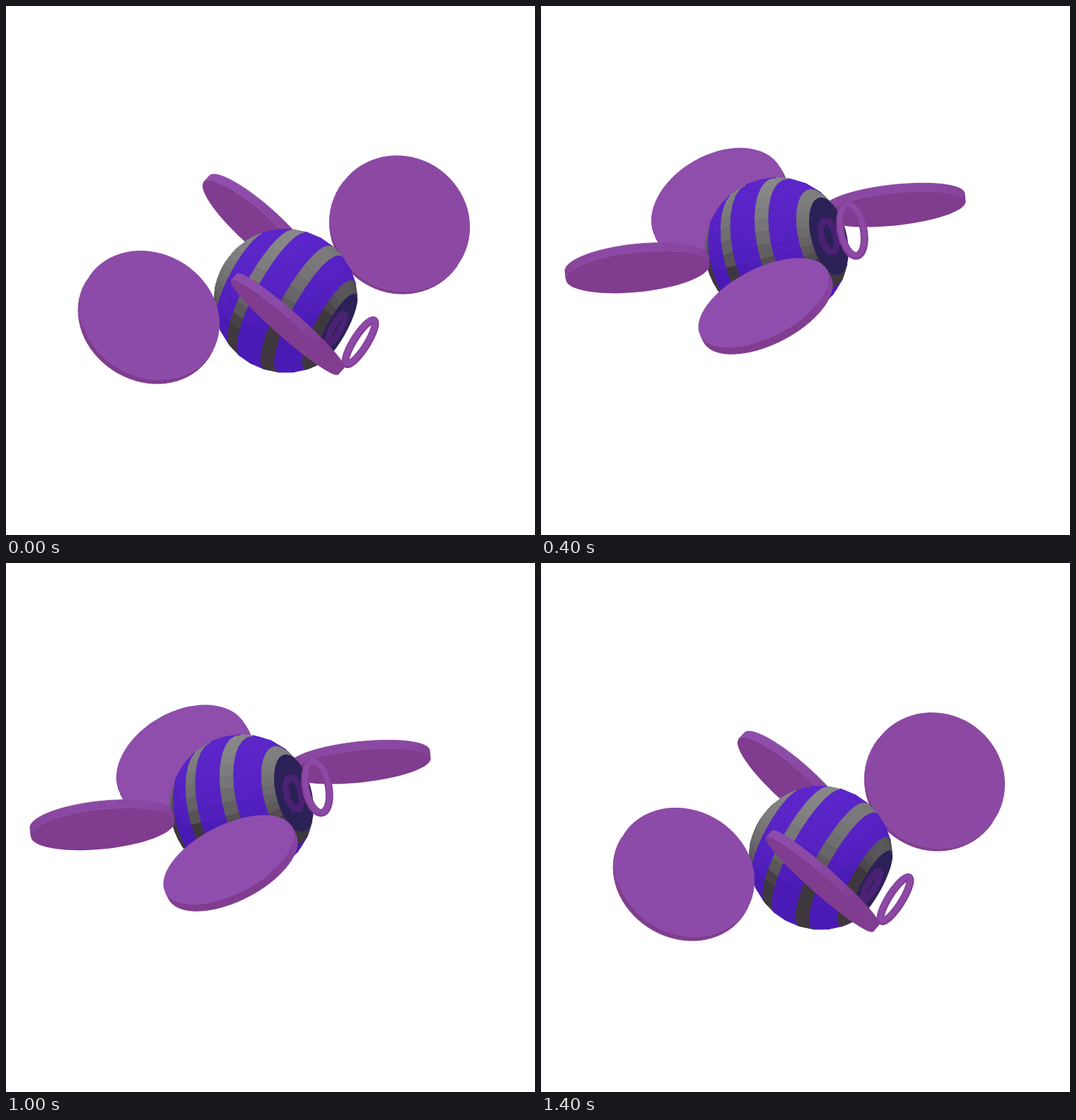
An HTML page with a canvas that plays this animation: 748 by 748 pixels, repeating every 1.5 s.

```html
<!DOCTYPE html>
<html lang="en">
<head>
<meta charset="utf-8">
<title>Flying striped ball</title>
<style>
  html, body { margin: 0; width: 100%; height: 100%; overflow: hidden; background: #fff; }
  canvas { display: block; width: 100vw; height: 100vh; }
</style>
</head>
<body>
<canvas id="stage" width="748" height="748"></canvas>
<script>
const ctx = document.getElementById('stage').getContext('2d');
const TAU = Math.PI * 2;
const RAD = Math.PI / 180;

// Pose shown in each 100 ms slot; the swing pauses briefly near its far end.
const SLOTS = [0, 1, 2, 3, 4, 5, 6, 6, 5, 5, 4, 3, 2, 1, 0];

// Vectors use screen axes: x right, y down, z towards the viewer.
const LIGHT = [-0.12, -0.94, 0.3];

// Each colour runs from unlit to fully lit.
const WING = [[128, 60, 143], [144, 79, 175]];
const GREY = [[62, 56, 62], [137, 137, 137]];
const BLUE = [[74, 26, 180], [92, 38, 202]];

// Every row holds four key values for the swing at cos = 1, .5, -.5, -1.
const leftWing = {
  r: 102,
  x: [202, 171, 136, 130.5], y: [440, 409, 370.5, 363],
  n: [[.265, .122, -.1, -.24], [-.445, -.76, -.957, -.763], [.855, .64, -.275, -.6]]
};
const rightWing = {
  r: 100,
  x: [556.7, 535.7, 500, 482.5], y: [309.2, 306.5, 281.5, 291],
  n: [[.19, .095, -.105, -.24], [-.27, -.66, -.968, -.765], [.944, .745, -.228, -.598]]
};
const backWing = {
  r: 101,
  x: [358.7, 316, 252, 244.4], y: [312, 291, 281.3, 283.2],
  n: [[.65, .37, -.37, -.63], [-.725, -.93, -.65, -.3], [-.235, -.03, .664, .716]]
};
const frontWing = {
  r: 100.8,
  x: [398, 385, 317.3, 271.5], y: [450, 436, 424.3, 443],
  n: [[.655, .37, -.4, -.663], [-.745, -.93, -.78, -.52], [-.126, -.01, .481, .538]]
};
const HALF_THICK = 6.2;

const ring = { r: 36.4, tilt: 3.5, x: [501, 488.5, 440, 406.5], y: [475.5, 426, 317.5, 267] };
const body = { r: 101.6, x: [395.6, 313], y: [416.8, 320] };
const HEADING = [28.9, 15.7, -14.2, -29.4];
const FACING = [.257, .33, .446, .446];
const LAT = Math.PI / 16;
const PLATE_STEP = 3;

const dot = (a, b) => a[0] * b[0] + a[1] * b[1] + a[2] * b[2];
const cross = (a, b) => [
  a[1] * b[2] - a[2] * b[1],
  a[2] * b[0] - a[0] * b[2],
  a[0] * b[1] - a[1] * b[0]
];
const unit = a => a.map(v => v / Math.hypot(...a));

// Smooth cubic in c through the four key values.
function swing(v, c) {
  const evenEnd = (v[0] + v[3]) / 2, evenMid = (v[1] + v[2]) / 2;
  const oddEnd = (v[0] - v[3]) / 2, oddMid = (v[1] - v[2]) / 2;
  const e2 = (evenEnd - evenMid) / 0.75;
  const o3 = (oddEnd - 2 * oddMid) / 0.75;
  return evenEnd - e2 + e2 * c * c + (oddEnd - o3) * c + o3 * c ** 3;
}

function shade([dark, light], normal) {
  const k = Math.max(0, dot(unit(normal), LIGHT)) ** 0.6;
  return `rgb(${dark.map((d, i) => Math.round(d + (light[i] - d) * k)).join()})`;
}

// Two unit vectors spanning the plane across n.
function plane(n) {
  const u = unit(cross(n, [1, 0, 0]));
  return [u, cross(n, u)];
}

function around([u, v], angle) {
  const c = Math.cos(angle), s = Math.sin(angle);
  return u.map((a, i) => a * c + v[i] * s);
}

function trace(points) {
  ctx.beginPath();
  points.forEach(p => ctx.lineTo(p[0], p[1]));
  ctx.closePath();
}

function stroke(points, color, width) {
  trace(points);
  ctx.strokeStyle = color;
  ctx.lineWidth = width;
  ctx.stroke();
}

// A thin outline in the same colour closes the seams between facets.
function fill(points, color, seam = 0) {
  trace(points);
  ctx.fillStyle = color;
  ctx.fill();
  if (seam) stroke(points, color, seam);
}

function circle(x, y, r, axes, steps) {
  return Array.from({ length: steps }, (_, i) => {
    const d = around(axes, i * TAU / steps);
    return [x + r * d[0], y + r * d[1]];
  });
}

function drawWing(w, c) {
  const x = swing(w.x, c), y = swing(w.y, c);
  let n = unit(w.n.map(v => swing(v, c)));
  if (n[2] < 0) n = n.map(v => -v);
  const axes = plane(n), steps = 72;
  const dx = n[0] * HALF_THICK, dy = n[1] * HALF_THICK;
  const near = circle(x + dx, y + dy, w.r, axes, steps);
  const far = circle(x - dx, y - dy, w.r, axes, steps);
  for (let i = 0; i < steps; i++) {
    const out = around(axes, (i + 0.5) * TAU / steps);
    const j = (i + 1) % steps;
    if (out[2] > 0) fill([near[i], near[j], far[j], far[i]], shade(WING, out), 0.8);
  }
  fill(near, shade(WING, n));
}

function heading(c, tilt = 0) {
  const a = (swing(HEADING, c) + tilt) * RAD, z = swing(FACING, c);
  const flat = Math.sqrt(1 - z * z);
  return [Math.cos(a) * flat, Math.sin(a) * flat, z];
}

function drawBody(c) {
  const p = (1 - c) / 2, { r } = body;
  const x = body.x[0] + (body.x[1] - body.x[0]) * p;
  const y = body.y[0] + (body.y[1] - body.y[0]) * p;
  const f = heading(c), axes = plane(f), steps = 32;

  const normal = (lat, lon) => {
    const side = around(axes, lon), a = Math.cos(lat), b = Math.sin(lat);
    return f.map((v, i) => v * a + side[i] * b);
  };
  const spot = (i, j) => {
    const d = normal(i * LAT, j * TAU / steps);
    return [x + r * d[0], y + r * d[1]];
  };

  // One grey row, then two blue rows; the tail is all grey.
  for (let i = PLATE_STEP; i < 16; i++) {
    const color = i > 12 || i % 3 === 0 ? GREY : BLUE;
    for (let j = 0; j < steps; j++) {
      const mid = normal((i + 0.5) * LAT, (j + 0.5) * TAU / steps);
      if (mid[2] < 0) continue;
      fill([spot(i, j), spot(i, j + 1), spot(i + 1, j + 1), spot(i + 1, j)], shade(color, mid), 1);
    }
  }

  // Dark front plate with an angular loop on it.
  const depth = r * Math.cos(PLATE_STEP * LAT);
  const px = x + f[0] * depth, py = y + f[1] * depth;
  fill(circle(px, py, r * Math.sin(PLATE_STEP * LAT), axes, steps), '#2c2157');
  stroke(circle(px, py, 24, axes, 8), '#4a2173', 9);
}

function drawRing(c) {
  const x = swing(ring.x, c), y = swing(ring.y, c);
  const axes = plane(heading(c, ring.tilt));
  stroke(circle(x, y, ring.r, axes, 60), '#833e96', 10.8);
  stroke(circle(x, y - 1.2, ring.r, axes, 60), '#8c49a6', 7.2);
}

function draw(ms) {
  const pose = SLOTS[Math.floor((ms % 1500) / 100)];
  const c = Math.cos(Math.PI * pose / 6);
  ctx.fillStyle = '#fff';
  ctx.fillRect(0, 0, 748, 748);
  ctx.lineJoin = 'round';
  drawWing(backWing, c);
  drawWing(rightWing, c);
  drawBody(c);
  drawWing(leftWing, c);
  drawRing(c);
  drawWing(frontWing, c);
}

const start = performance.now();
function loop() {
  draw(performance.now() - start);
  requestAnimationFrame(loop);
}
loop();
</script>
</body>
</html>
```
